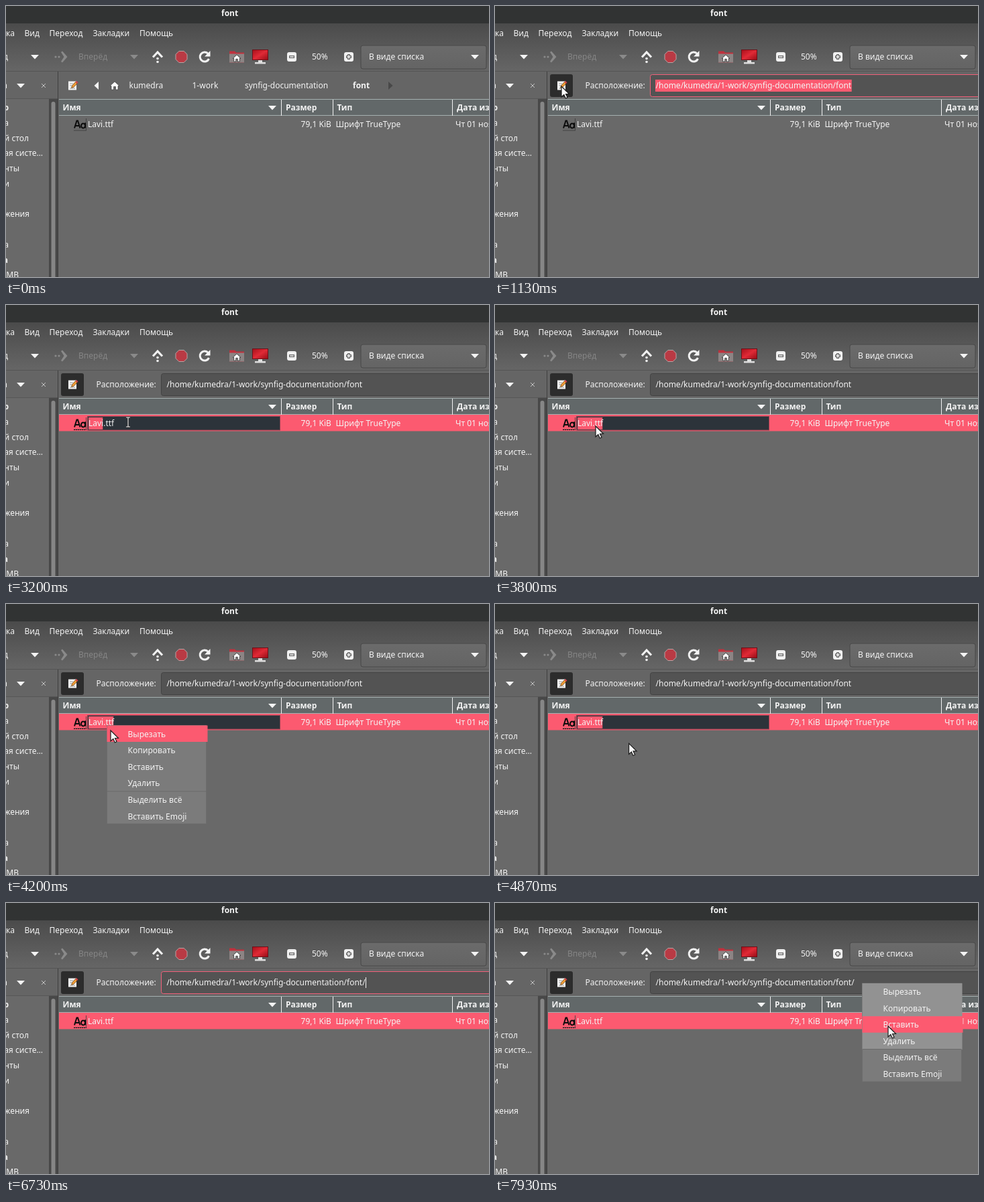
Write an HTML page that moves like this. It is 720 by 405 pixels and loops after 8000 ms.

```html
<!DOCTYPE html>
<html lang="ru">
<head>
<meta charset="utf-8">
<title>font</title>
<style>
html, body { margin: 0; width: 100%; height: 100%; overflow: hidden; background: #696969; }
svg { display: block; width: 720px; height: 405px; }
text { font: 12px "Noto Sans", "Open Sans", sans-serif; fill: #f4f4f4; white-space: pre; }
.b { font-weight: 700; }
.end { text-anchor: end; }
.dim { fill: #868686; }
.line { fill: none; stroke: #f2f2f2; stroke-width: 2; }
.pink { fill: #fc5a70; }
</style>
</head>
<body>
<svg viewBox="0 0 720 405">
  <defs>
    <linearGradient id="bar" x1="0" y1="0" x2="0" y2="1">
      <stop offset="0" stop-color="#4b4b4b"/><stop offset="1" stop-color="#666"/>
    </linearGradient>
    <linearGradient id="combo" x1="0" y1="0" x2="0" y2="1">
      <stop offset="0" stop-color="#6b6b6b"/><stop offset="1" stop-color="#646464"/>
    </linearGradient>
    <linearGradient id="screen" x1="0" y1="0" x2="1" y2="1">
      <stop offset="0" stop-color="#a80f1a"/><stop offset=".5" stop-color="#e02a36"/><stop offset="1" stop-color="#980c16"/>
    </linearGradient>
    <path id="house" d="M-7 0.500L0-6L7 0.500H5V6H1.500V1.500H-1.500V6H-5V0.500Z"/>
    <path id="down" d="M-6-3H6L0 3.500Z"/>
  </defs>

  <rect width="720" height="405" fill="#696969"/>
  <rect width="720" height="26" fill="#313333"/>
  <rect y="26" width="720" height="72" fill="url(#bar)"/>
  <rect y="98" width="720" height="41" fill="#656565"/>
  <rect y="97" width="720" height="1" fill="#545454"/>
  <text class="b" x="321" y="15">font</text>

  <g id="menubar">
    <text class="end" x="13" y="45">Правка</text>
    <text x="27.500" y="45">Вид</text>
    <text x="64.500" y="45">Переход</text>
    <text x="129.500" y="45">Закладки</text>
    <text x="199" y="45">Помощь</text>
  </g>

  <g id="toolbar">
    <text class="end" x="3" y="80">Назад</text>
    <use href="#down" x="43" y="76" fill="#f4f4f4"/>
    <g fill="#8a8a8a">
      <circle cx="74" cy="76" r="1.600"/><circle cx="79" cy="76" r="1.600"/>
      <path d="M82 69L84 67.500L91.500 76L84 84.500L82 83L86.500 76Z"/>
      <use href="#down" x="191" y="76"/>
    </g>
    <text class="dim" x="108" y="80">Вперёд</text>
    <path class="line" d="M219 76.500L226 69L233 76.500" style="stroke-width:3.200"/>
    <g fill="#f4f4f4"><circle cx="226" cy="78.500" r="1.800"/><circle cx="226" cy="83.500" r="1.800"/></g>
    <path d="M257.800 67.500H265.200L270 72.300V79.700L265.200 84.500H257.800L253 79.700V72.300Z" fill="#b93a44" stroke="#b9a5a5"/>
    <path class="line" d="M302.500 79A7 7 0 1 1 301 71" style="stroke-width:3"/>
    <path d="M304.500 67V75.500H296Z" fill="#f4f4f4"/>
    <path d="M333 67.500H341L343 69.500H355V84.500H333Z" fill="#c0313d"/>
    <rect x="333" y="71.500" width="22" height="13" fill="#8c8484"/>
    <g transform="translate(344 78) scale(.85)"><use href="#house" fill="#fff" stroke="#333"/></g>
    <rect x="367.500" y="65.500" width="23" height="15" fill="url(#screen)" stroke="#6c1018"/>
    <path d="M376 81H382V84H387V86.500H371V84H376Z" fill="#dedede"/>
    <g fill="#f1f1f1">
      <rect x="419" y="69" width="14" height="14" rx="3"/><rect x="504" y="69" width="14" height="14" rx="3"/>
    </g>
    <g fill="none" stroke="#666" stroke-width="1.200">
      <rect x="422.600" y="74.600" width="6.800" height="2.800"/>
      <path d="M509.600 72.600H512.400V74.600H514.400V77.400H512.400V79.400H509.600V77.400H507.600V74.600H509.600Z"/>
    </g>
    <text x="456" y="80">50%</text>
    <rect x="529" y="59" width="187" height="35" rx="3" fill="url(#combo)" stroke="#484848"/>
    <text x="541" y="80">В виде списка</text>
    <use href="#down" x="699" y="76" fill="#f4f4f4"/>
  </g>

  <g id="sidebar">
    <text class="end" x="2" y="123">Места</text>
    <use href="#down" x="22" y="119" fill="#f4f4f4"/>
    <path d="M53 116L59 122M59 116L53 122" stroke="#c4c4c4"/>
    <path d="M0 138.500H78" stroke="#565656"/>
    <rect x="64" y="139" width="13" height="266" fill="#484848"/>
    <rect x="67.500" y="143" width="6" height="270" rx="3" fill="#868686"/>
    <path d="M77.500 98V405" stroke="#3f3f3f"/>
  </g>

  <g id="crumbs">
    <path d="M138 113V125L131.500 119Z" fill="#f4f4f4"/>
    <use href="#house" x="162" y="119" fill="#fff" stroke="#444" stroke-width=".7"/>
    <text x="183.500" y="123">kumedra</text>
    <text x="277.500" y="123">1-work</text>
    <text x="356" y="123">synfig-documentation</text>
    <text class="b" x="517" y="123">font</text>
    <path d="M570 113V125L576.500 119Z" fill="#484848"/>
  </g>

  <g id="location">
    <rect x="82" y="102" width="34" height="34" rx="3" fill="#2c2c2c"/>
    <text x="134.500" y="123">Расположение:</text>
    <rect id="entry" x="231.500" y="102.500" width="520" height="33" rx="3" fill="#535353"/>
    <rect id="pathSel" class="pink" x="239" y="110" height="18"/>
    <text id="path" x="239.500" y="123">/home/kumedra/1-work/synfig-documentation/font</text>
    <rect id="caret" y="111" width="1" height="16" fill="#f4f4f4"/>
  </g>

  <g id="editIcon">
    <rect x="93" y="112.500" width="12" height="13" fill="#f6f6f6"/>
    <path d="M95 116H100M95 119H98.500M95 123H103" stroke="#999"/>
    <path d="M97.500 122.500L98.500 119L103.500 113.500L106 116L101 121.300Z" fill="#ef9b35" stroke="#5c3a14" stroke-width=".7"/>
    <path d="M103.500 113.500L105 112L107.500 114.500L106 116Z" fill="#d8404a"/>
  </g>

  <g id="list">
    <rect x="79" y="139" width="641" height="25" fill="#626869"/>
    <path d="M79 139.500H720M79 163.500H720" stroke="#a5b0b0"/>
    <path d="M410.500 140V164M487.500 140V164M665.500 140V164" stroke="#f2f2f2"/>
    <text class="b" x="84.500" y="156">Имя</text>
    <use href="#down" x="397" y="152" fill="#f4f4f4"/>
    <text class="b" x="417" y="156">Размер</text>
    <text class="b" x="493.500" y="156">Тип</text>
    <text class="b" x="672" y="156">Дата изменения</text>
    <rect id="row" class="pink" x="79" y="164" width="641" height="24.500"/>
    <path d="M119.500 168V186M101 186H120" stroke="#3a3a3a" opacity=".8"/>
    <path d="M102 182.500L105.500 171.500H107L110.500 182.500M103.500 179H110M118 174.500V182.500M118 178.500A3 3.400 0 1 0 118 179.500" fill="none" stroke="#0c0c0c" stroke-width="2"/>
    <path id="dots" d="M101 186.500H120" stroke="#111" stroke-dasharray="2 1"/>
    <g id="rename">
      <rect x="121.500" y="166.500" width="287" height="20.500" fill="#2c333a" stroke="#8a4350"/>
      <rect id="nameSel" x="123" y="168" height="18" class="pink"/>
    </g>
    <text id="name" y="181">Lavi.ttf</text>
    <text class="end" x="484.800" y="181">79,1 KiB</text>
    <text x="491.500" y="181">Шрифт TrueType</text>
    <text x="670" y="181">Чт 01 ноября</text>
  </g>

  <g id="menu">
    <rect width="148" height="147" fill="#7b7b7b" stroke="#6c6c6c"/>
    <rect id="menuTop" width="149" height="99" fill="#929292"/>
    <path d="M0 98.500H148" stroke="#6a6a6a"/>
    <rect id="hover" class="pink" width="150" height="24.500"/>
  </g>

  <g id="pointer">
    <path id="arrow" d="M0 0V16L3.800 12.500L6.300 18L9 16.800L6.500 11.500H11.500Z" fill="#fafafa" stroke="#1c1c1c" stroke-width="1.200"/>
    <g id="beam" fill="none">
      <path d="M-3-7H3M0-7V7M-3 7H3" stroke="#222" stroke-width="2.600"/>
      <path d="M-3-7H3M0-7V7M-3 7H3" stroke="#fafafa" stroke-width="1.100"/>
    </g>
  </g>
</svg>
<script>
const LOOP = 8000;
const el = id => document.getElementById(id);
const within = (t, a, b = LOOP) => t >= a && t < b;
const show = (id, on) => el(id).setAttribute("display", on ? "inline" : "none");
const move = (id, x, y) => el(id).setAttribute("transform", `translate(${x} ${y})`);

function addText(parent, str, x, y, cls = "") {
  const node = document.createElementNS("http://www.w3.org/2000/svg", "text");
  node.textContent = str;
  node.setAttribute("x", x);
  node.setAttribute("y", y);
  node.setAttribute("class", cls);
  el(parent).append(node);
}

// Sidebar labels run off the left edge: label, right end, baseline, class
[
  ["Компьютер", 4, 156, "b"], ["Домашняя папка", 4, 179], ["Рабочий стол", 34, 202],
  ["Файловая систе…", 55, 224], ["Документы", 20, 247], ["Загрузки", 5, 270],
  ["Изображения", 35, 315], ["Корзина", 4, 361], ["Устройства", 3, 384, "b"], ["512 MB", 19, 406]
].forEach(([label, x, y, cls = ""]) => addText("sidebar", label, x, y, "end " + cls));

const STEP = 24.6;
["Вырезать", "Копировать", "Вставить", "Удалить", "Выделить всё", "Вставить Emoji"]
  .forEach((label, i) => addText("menu", label, 31, 17 + i * STEP));

// Pointer stops: time, x, y
const STOPS = [
  [470, 330, 405], [1050, 99, 120], [1800, 99, 120], [2200, 149, 177],
  [2700, 149, 177], [3100, 182, 175], [3500, 182, 175], [3780, 150, 181],
  [3900, 150, 181], [4130, 156, 189], [4330, 156, 189], [4560, 176, 217],
  [4750, 176, 217], [5400, 435, 123], [5490, 435, 123], [5750, 546, 119],
  [7330, 546, 119], [7850, 586, 184], [LOOP, 586, 184]
];

function pointerAt(t) {
  const i = STOPS.findIndex(s => s[0] > t);
  if (i <= 0) return STOPS[0].slice(1);
  const [t0, x0, y0] = STOPS[i - 1], [t1, x1, y1] = STOPS[i];
  const p = (t - t0) / (t1 - t0), e = p * p * (3 - 2 * p);
  return [x0 + (x1 - x0) * e, y0 + (y1 - y0) * e];
}

const PATH = el("path").textContent;

function draw(t) {
  const editing = t >= 1110, picked = within(t, 1110, 2400);
  const clicked = within(t, 5780, 7270), renaming = within(t, 2800, 5780);
  const first = within(t, 3830, 4640), second = t >= 7300;
  const [x, y] = pointerAt(t);

  show("crumbs", !editing);
  show("location", editing);
  show("pathSel", picked);
  show("caret", clicked);
  el("entry").setAttribute("stroke", picked || clicked ? "#f2607a" : "#424242");
  const path = PATH + (t >= 6500 ? "/" : "");
  if (el("path").textContent !== path) el("path").textContent = path;
  if (editing) {
    const w = el("path").getComputedTextLength();
    el("pathSel").setAttribute("width", w + 1);
    el("caret").setAttribute("x", Math.round(240 + w));
  }

  show("row", t >= 2400);
  show("dots", t >= 2400);
  show("rename", renaming);
  el("name").setAttribute("x", renaming ? 123 : 122);
  const chars = t < 3620 ? 4 : 8;
  el("nameSel").setAttribute("width", el("name").getSubStringLength(0, chars) - 1);

  show("menu", first || second);
  show("menuTop", second);
  const mx = second ? 547.5 : 150.5, my = second ? 120 : 181.5;
  move("menu", mx, my);
  const item = Math.floor((y - my) / STEP);
  show("hover", item >= 0 && item < 6);
  move("hover", 0, Math.max(0, item) * STEP);

  const beam = within(t, 2900, 3690) || within(t, 5600, 6270) || within(t, 7200, 7330);
  show("pointer", within(t, 470, 6270) || t >= 7200);
  show("beam", beam);
  show("arrow", !beam);
  move("pointer", x, y);
}

const start = performance.now();
function tick() {
  draw((performance.now() - start) % LOOP);
  requestAnimationFrame(tick);
}
draw(0);
requestAnimationFrame(tick);
</script>
</body>
</html>
```
